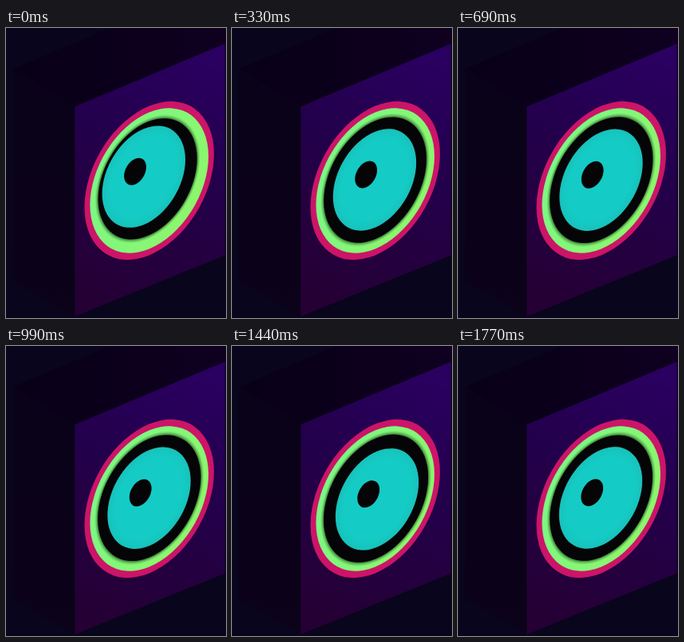
Write an HTML page that moves like this. It is 276x363 px and loops after 1800 ms.

```html
<!DOCTYPE html>
<html lang="en">
<head>
<meta charset="utf-8">
<title>Speaker</title>
<style>
  html, body { margin: 0; width: 100%; height: 100%; overflow: hidden; background: #09051c; }
  svg { display: block; width: 100%; height: 100%; }
</style>
</head>
<body>
<svg viewBox="0 0 276 363" preserveAspectRatio="none">
  <defs>
    <linearGradient id="front" x1=".6" y1="0" x2=".35" y2="1">
      <stop offset="0" stop-color="#2a0060"/>
      <stop offset=".4" stop-color="#23004b"/>
      <stop offset="1" stop-color="#250034"/>
    </linearGradient>
    <linearGradient id="side" x1="0" y1="0" x2="0" y2="1">
      <stop offset="0" stop-color="#090219"/>
      <stop offset="1" stop-color="#0c0219"/>
    </linearGradient>
    <linearGradient id="top" x1="0" y1="0" x2="1" y2="0">
      <stop offset="0" stop-color="#080017"/>
      <stop offset="1" stop-color="#0f0020"/>
    </linearGradient>
    <linearGradient id="rim" x1="0" y1="0" x2="1" y2=".6">
      <stop offset="0" stop-color="#78f88a"/>
      <stop offset="1" stop-color="#8cf66c"/>
    </linearGradient>
    <radialGradient id="shade">
      <stop offset=".93" stop-color="#285a26"/>
      <stop offset="1" stop-color="#5fbf50" stop-opacity="0"/>
    </radialGradient>
    <radialGradient id="cone">
      <stop offset=".8" stop-color="#14ccc5"/>
      <stop offset="1" stop-color="#17c2bb"/>
    </radialGradient>
    <filter id="soft"><feGaussianBlur stdDeviation=".5"/></filter>
  </defs>

  <path d="M9 51 L130 0 H276 V19 L86 98Z" fill="url(#top)"/>
  <path d="M9 51 L86 98 V361 L9 318Z" fill="url(#side)"/>
  <path d="M86.3 98.4 L274.6 19.8 V284.6 L86.3 361Z" fill="url(#front)"/>

  <!-- circles lying in the plane of the front panel -->
  <g filter="url(#soft)">
    <g transform="matrix(.87 -.357 0 1 179.7 191)">
      <circle r="93.4" fill="#cc1468"/>
      <circle r="85.4" fill="url(#rim)"/>
    </g>
    <g id="surround">
      <circle r="79" fill="url(#shade)"/>
      <circle r="74" fill="#050406"/>
    </g>
    <g id="driver">
      <circle r="60" fill="url(#cone)" transform="matrix(.87 -.357 0 1 179 190)"/>
      <circle r="16" fill="#050406" transform="matrix(.87 -.357 0 1 168.2 183.5)"/>
    </g>
  </g>
</svg>
<script>
  const LOOP = 1800, STEP = 30;
  // time in ms, inward travel of the cone in px
  const drift = [[0, 0], [330, 0], [690, .5], [990, .5], [1260, 3.4], [1440, 3], [1770, 0], [1800, 0]];
  const surround = document.getElementById('surround');
  const driver = document.getElementById('driver');

  function travel(t) {
    const i = drift.findIndex(([end]) => end > t);
    const [t0, a] = drift[i - 1], [t1, b] = drift[i];
    const p = (t - t0) / (t1 - t0);
    const kick = -6.2 * Math.exp(-t / 70);
    return a + (b - a) * p * p * (3 - 2 * p) + kick;
  }

  function draw() {
    const t = Math.floor(performance.now() % LOOP / STEP) * STEP;
    const d = travel(t);
    driver.setAttribute('transform', `translate(${d} ${d * .62})`);
    // the surround stretches as the cone sinks in
    surround.setAttribute('transform',
      `matrix(.87 -.357 0 1 ${179.6 + d * .32} ${190.2 + d * .22}) scale(${1 + d * .006})`);
    requestAnimationFrame(draw);
  }
  draw();
</script>
</body>
</html>
```
